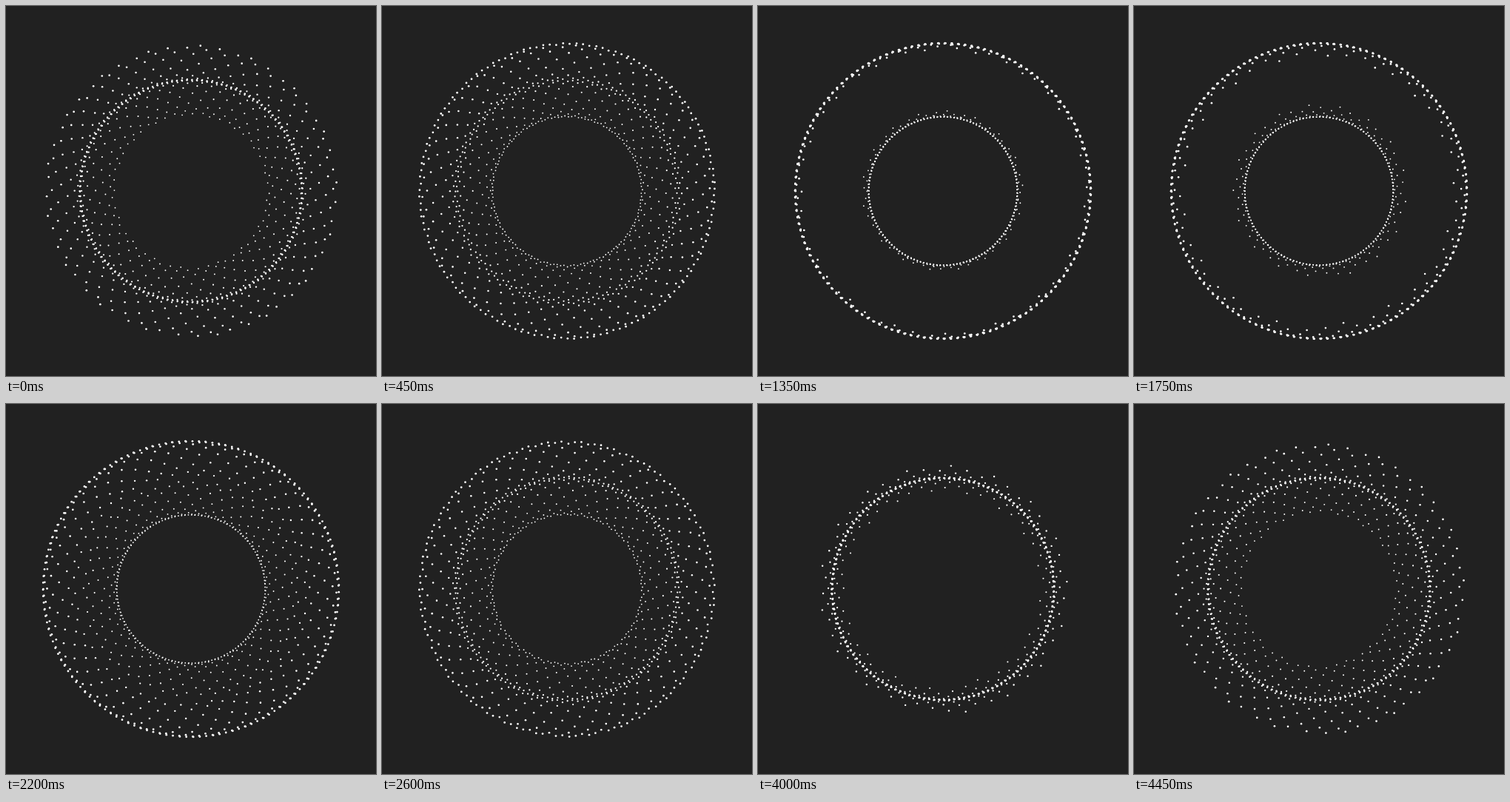
These frames come from a looping animation (500 by 500 pixels, 4.5 s). An HTML page with a canvas:

```html
<!DOCTYPE html>
<html lang="en">
<head>
<meta charset="utf-8">
<title>Breathing rings</title>
<style>
  html, body { margin: 0; width: 100%; height: 100%; overflow: hidden; background: #212121; }
  canvas { display: block; width: 500px; height: 500px; }
</style>
</head>
<body>
<canvas id="stage" width="500" height="500"></canvas>
<script>
  const ctx = document.getElementById("stage").getContext("2d");
  const TAU = Math.PI * 2;
  const LOOP = 4500, TICK = 50;
  const COUNT = 1000;
  const FIRST_ANGLE = 169.5, STEP = 10.3605;  // degrees, clockwise from the top
  const FIRST_DELAY = 4076, STAGGER = 1550;   // ms
  const MID = 150, REACH = 50;
  const STEEP = 2.4;

  // Even dots swing outwards from the middle ring, odd dots inwards.
  const dots = Array.from({ length: COUNT }, (_, i) => {
    const angle = (FIRST_ANGLE - i * STEP) * TAU / 360;
    return {
      x: Math.sin(angle),
      y: -Math.cos(angle),
      side: i % 2 ? -1 : 1,
      delay: FIRST_DELAY + STAGGER * i / (COUNT - 1)
    };
  });

  // Rounded square wave between 0 and 1.
  const swing = phase =>
    0.5 + 0.5 * Math.tanh(STEEP * Math.sin(TAU * phase)) / Math.tanh(STEEP);

  const dotSize = r => 0.4 + 0.0049 * r;

  function draw(time) {
    ctx.fillStyle = "#212121";
    ctx.fillRect(0, 0, 500, 500);
    ctx.fillStyle = "#fff";
    for (const dot of dots) {
      const r = MID + dot.side * REACH * swing((time - dot.delay) / LOOP);
      ctx.beginPath();
      ctx.arc(250 + dot.x * r, 250 + dot.y * r, dotSize(r), 0, TAU);
      ctx.fill();
    }
  }

  function frame() {
    const time = performance.now() % LOOP;
    draw(Math.floor(time / TICK) * TICK);
    requestAnimationFrame(frame);
  }
  frame();
</script>
</body>
</html>
```
